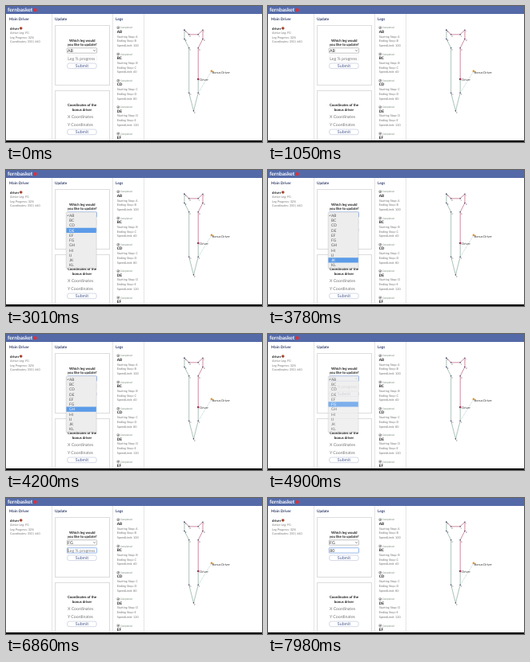
Write an HTML page that moves like this. It is 320 px wide and 171 px high and loops after 8 s.

```html
<!DOCTYPE html>
<html lang="en">
<head>
<meta charset="utf-8">
<title>Driver tracking</title>
<style>
html, body { margin: 0; width: 100%; height: 100%; overflow: hidden; background: #fff; }
svg { display: block; width: 100vw; height: 100vh; }
text { font-family: Lato, "Open Sans", sans-serif; text-rendering: geometricPrecision; white-space: pre; }
</style>
</head>
<body>
<svg id="stage" viewBox="0 0 320 171"></svg>
<script>
const NAVY = '#35426f', GREY = '#757575', DARK = '#1c1c1c';
const BLUE = '#5b9be8', RED = '#b4506e', GREEN = '#7fa391';
const LOOP = 8000, ROW = 6.25, MENU_TOP = 54;
const legs = ['AB', 'BC', 'CD', 'DE', 'EF', 'FG', 'GH', 'HI', 'IJ', 'JK', 'KL'];

// y is the middle of the capital letters
const text = (s, x, y, size, fill = GREY, extra = '') =>
  `<text x="${x}" y="${y + size * .35}" font-size="${size}" fill="${fill}" ${extra}>${s}</text>`;
const bold = (s, x, y, size, fill = DARK, extra = '') => text(s, x, y, size, fill, 'font-weight="700" ' + extra);
const mid = 'text-anchor="middle"';
const rect = (x, y, w, h, fill, extra = '') =>
  `<rect x="${x}" y="${y}" width="${w}" height="${h}" fill="${fill}" ${extra}/>`;
const line = (pts, color, extra = '') =>
  `<polyline points="${pts.join(' ')}" fill="none" stroke="${color}" stroke-width=".65" ${extra}/>`;
const dot = (x, y, r, fill) => `<circle cx="${x}" cy="${y}" r="${r}" fill="${fill}"/>`;
const panel = (y, h) => rect(61.5, y, 68, h, '#fff', 'stroke="#dcdcdc"');
const button = y => rect(76.6, y - 3.3, 36.6, 6.6, '#fff', 'rx="2.6" stroke="#a9b2cf" stroke-width=".5"') +
  text('Submit', 95, y, 5.3, '#46568c', mid);
const field = (id, y) => rect(76.3, y - 3.2, 37.2, 6.4, '#fff', `id="${id}" stroke-width=".5" rx=".6"`);

function driverColumn() {
  return bold('Main Driver', 4, 16.2, 4.7, NAVY) + bold('driver', 5, 28.2, 4.3) + dot(18.7, 28, 1.8, '#a8452f') +
    ['Active Leg: FG', 'Leg Progress: 32%', 'Coordinates: 350 | 640']
      .map((s, i) => text(s, 5, 34 + i * 5.5, 3.75)).join('');
}

function forms() {
  return bold('Update', 61, 16.2, 4.7, NAVY) + panel(24.5, 75) + panel(106.5, 70) +
    bold('Which leg would', 95.2, 43, 4.4, DARK, mid) + bold('you like to update?', 95.2, 48.8, 4.4, DARK, mid) +
    field('select', 56) + '<g id="choice"></g>' +
    line(['109.2,55.3', '110.4,56.6', '111.6,55.3'], '#444') +
    field('input', 65.9) + '<g id="value"></g>' + rect(77.3, 63.3, .4, 5.2, '#333', 'id="caret"') +
    button(75.3) +
    bold('Coordinates of the', 95, 124.6, 4.4, DARK, mid) + bold('bonus driver', 95, 130.4, 4.4, DARK, mid) +
    text('X Coordinates', 77, 139, 5.2) + text('Y Coordinates', 77, 149, 5.2) + button(158.4);
}

function legColumn() {
  const limits = [100, 60, 80, 120, 100];
  return bold('Legs', 137, 16.2, 4.7, NAVY) + limits.map((limit, i) => {
    const y = 27.2 + i * 33.3, [from, to] = legs[i];
    return rect(138.9, y - 1.3, 2.6, 2.6, '#fff', 'rx=".4" stroke="#555" stroke-width=".5"') +
      line([`139.4,${y}`, `140.1,${y + .7}`, `141.2,${y - .8}`], '#444') +
      text('Completed', 142.7, y, 3.15, '#6f8270') + bold(from + to, 138.7, y + 4.8, 4.7) +
      [`Starting Stop: ${from}`, `Ending Stop: ${to}`, `SpeedLimit: ${limit}`]
        .map((s, k) => text(s, 138.7, y + 11 + k * 5.7, 3.8)).join('');
  }).join('');
}

function map() {
  const stops = [[20, 10], [20, 20], [25, 30], [25, 80], [30, 100], [35, 80], [35, 30], [40, 20], [40, 10], [35, 15], [25, 15], [20, 10]]
    .map(([x, y]) => [200 + x * 1.15, 18.9 + y * 1.13]);
  const driver = [240.25, 92], bonus = [257, 82];
  return line([...stops.slice(0, 6), driver], GREEN) + line([driver, ...stops.slice(6)], RED) +
    line([bonus, stops[5]], '#a3c3cb', 'stroke-dasharray="1 .6"') +
    stops.map(([x, y], i) => dot(x, y, .8, '#4b4a6c') +
      (i < 11 ? text('ABCDEFGHIJK'[i], x + .7, y + 1.8, 2.6, '#555') : '')).join('') +
    dot(...driver, 1.2, '#8c2445') + text('Driver', 242.3, 93, 3.85, '#333') +
    dot(...bonus, 1.4, '#e39a35') + text('Bonus Driver', 257.8, 83.2, 3.85, '#333');
}

function menu() {
  return `<g id="menu">` + rect(74.9, 53, 38.4, 70.6, '#000', 'rx="1.2" opacity=".12" transform="translate(0 .7)"') +
    rect(75.2, 53, 37.8, 70.3, '#ededed', 'rx="1" stroke="#c8c8c8" stroke-width=".4"') +
    rect(75.4, 0, 37.4, ROW, BLUE, 'id="hover"') +
    line(['76.6,57.2', '77.2,57.9', '78.2,56.2'], '#555') +
    legs.map((s, i) => text(s, 79, MENU_TOP + (i + .5) * ROW, 4.8, '#555', 'class="item"')).join('') + '</g>';
}

const stage = document.getElementById('stage');
stage.innerHTML = rect(0, 0, 320, 171, '#fff') +
  [57, 133, 172].map(x => rect(x, 10, 1, 159, '#e4e4e4')).join('') +
  rect(0, 0, 320, 10, '#546aa8') + bold('fernbasket', 2, 5, 6.6, '#fff') + dot(36.2, 5, 2.3, '#d8323c') +
  driverColumn() + forms() + legColumn() + map() + menu() +
  rect(0, 169, 320, 2, '#000');

const el = id => document.getElementById(id);
const items = [...document.querySelectorAll('.item')];
const parts = Object.fromEntries(['select', 'choice', 'input', 'value', 'caret', 'menu', 'hover'].map(id => [id, el(id)]));

// [time, hovered row], -1 for none
const hovers = [[2520, 0], [2660, -1], [2800, 1], [2870, 2], [3010, 3], [3080, 4], [3150, 5], [3290, 6], [3570, 7],
  [3710, 8], [3780, 9], [3990, 8], [4060, 7], [4200, 6], [4340, 5], [4760, -1], [4830, 5]];
const within = (t, a, b) => t >= a && t < b;
const show = (node, on) => node.setAttribute('visibility', on ? 'visible' : 'hidden');

function focus(node, on, idle) {
  node.setAttribute('stroke', on ? '#6f9de2' : idle);
  node.setAttribute('stroke-width', on ? .7 : .5);
}

function draw(t) {
  const open = within(t, 2520, 5180);
  const row = hovers.reduce((last, [at, i]) => t >= at ? i : last, -1);
  show(parts.menu, open);
  parts.menu.setAttribute('opacity', t < 4830 ? 1 : Math.max(0, 1 - (t - 4830) / 350));
  show(parts.hover, open && row >= 0);
  parts.hover.setAttribute('y', MENU_TOP + Math.max(row, 0) * ROW);
  items.forEach((item, i) => item.setAttribute('fill', i === row ? '#fff' : '#555'));

  parts.choice.innerHTML = text(t < 4830 ? 'AB' : 'FG', 77, 56.1, 5.2, '#333');
  focus(parts.select, within(t, 2520, 5810), '#888');
  focus(parts.input, t >= 5810, '#ececec');

  const typed = t < 7350 ? '' : t < 7630 ? '8' : '80';
  parts.value.innerHTML = typed ? text(typed, 77.3, 65.9, 5.2, '#333') : text('Leg % progress', 77.3, 65.9, 5.2, '#777');
  show(parts.caret, within(t, 5810, 6300) || within(t, 6860, 7910));
  parts.caret.setAttribute('x', 77.2 + typed.length * 3.05);
}

const start = performance.now();
function tick(now) {
  draw(Math.max(0, now - start) % LOOP);
  requestAnimationFrame(tick);
}
draw(0);
requestAnimationFrame(tick);
</script>
</body>
</html>
```
